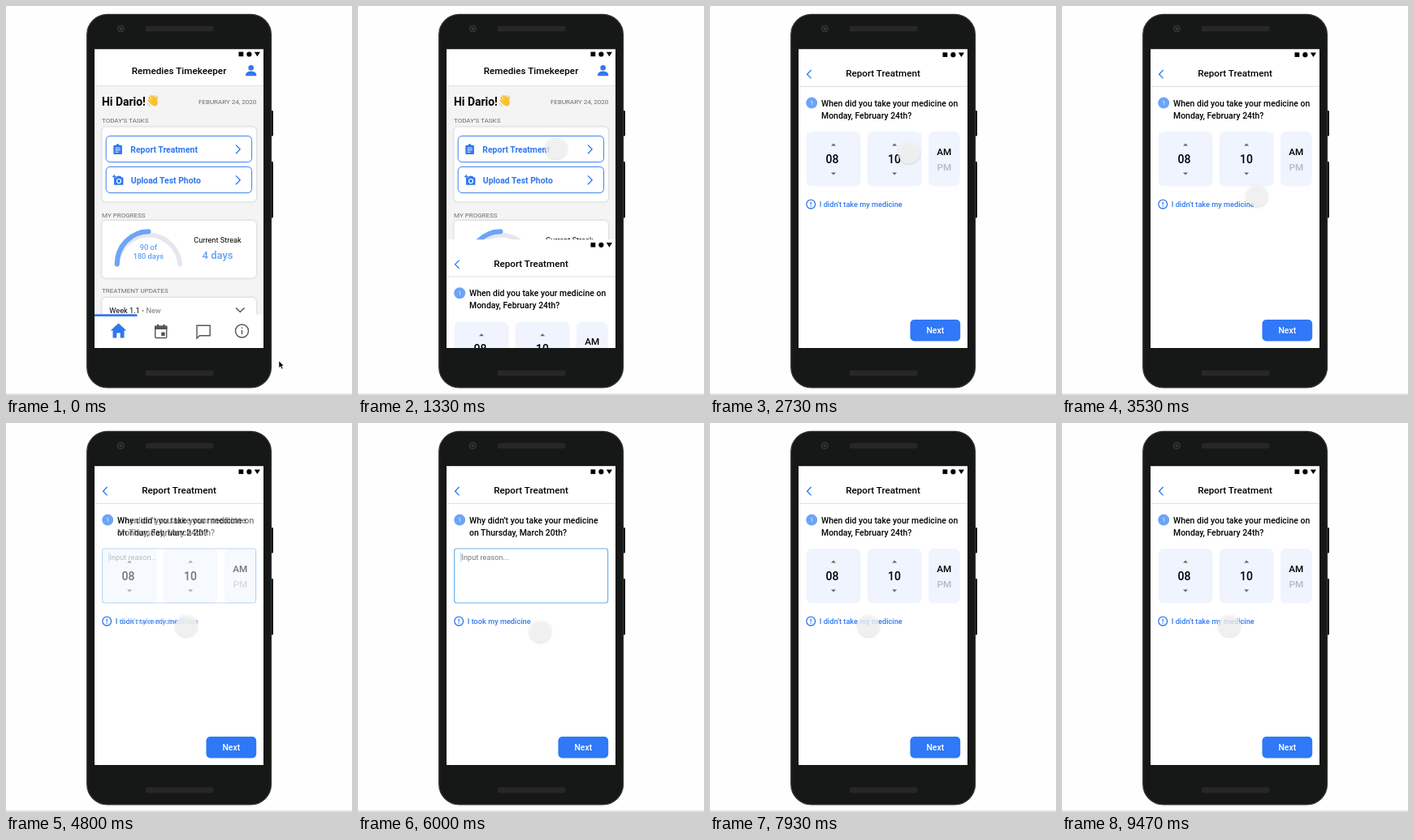
Write an HTML page that moves like this. It is 426 px wide and 480 px high and loops after 9790 ms.

```html
<!DOCTYPE html>
<html lang="en">
<head>
<meta charset="utf-8">
<title>Medicine app</title>
<style>
html, body { margin: 0; width: 100%; height: 100%; overflow: hidden; background: #fefefe; }
svg { display: block; width: 426px; height: 480px; }
text { font-family: Roboto, Arial, sans-serif; font-weight: 500; white-space: pre; }
.cap { font-size: 8px; font-weight: 400; fill: #6c6c6c; }
.small { font-size: 9.2px; }
.mid { font-size: 10.45px; }
.title { font-size: 11.7px; text-anchor: middle; }
.num { font-size: 14px; }
.c { text-anchor: middle; }
.blue { fill: #2f78ee; }
.soft { fill: #62a0f6; }
.line { fill: none; stroke: #2f78ee; stroke-width: 1.3; }
.gray { fill: none; stroke: #555; stroke-width: 1.4; }
.tile { fill: #eff4fe; }
.card { fill: #fff; filter: drop-shadow(0 0 1.5px #0003); }
</style>
</head>
<body>
<svg viewBox="0 0 426 480">
  <defs>
    <clipPath id="clip"><rect x="109" y="53.5" width="208" height="368.5"/></clipPath>
    <g id="status">
      <rect x="286.5" y="57.3" width="5.8" height="5.6"/>
      <circle cx="299.4" cy="60.2" r="3.1"/>
      <path d="M305.8 57.4h7.2l-3.6 5.6z"/>
    </g>
    <g id="frame">
      <rect x="109" y="53.5" width="208" height="369" fill="#fff"/>
      <use href="#status"/>
      <path d="M109 99.3h208" stroke="#dcdcdc"/>
      <path class="line" stroke-width="1.6" d="M124.6 79l-5 5.2 5 5.2"/>
      <text class="title" x="213" y="87.2">Report Treatment</text>
      <circle cx="125.2" cy="119.6" r="7" fill="#6ba5f7"/>
      <text class="c" x="125.2" y="122" font-size="7" fill="#d5e5fd">1</text>
      <circle class="line" cx="124.2" cy="244.6" r="5.4"/>
      <path class="line" d="M124.2 241.5v3.8m0 1.2v1.3"/>
      <rect x="246.5" y="387" width="61.7" height="26.5" rx="5" fill="#2f78f7"/>
      <text class="mid c" x="277.3" y="404" fill="#fff">Next</text>
    </g>
    <g id="stepper">
      <rect class="tile" x="-33.5" y="155" width="67" height="67.5" rx="7"/>
      <path d="M-3 172.6l3-3 3 3zM-3 205.6l3 3 3-3z" fill="#666"/>
    </g>
    <g id="task">
      <rect x="123.2" y="160.4" width="179.4" height="32.2" rx="5" fill="#fff" stroke="#3a7fee"/>
      <path class="line" stroke-width="1.6" d="M283 171.4l5.2 5.4-5.2 5.4"/>
    </g>
  </defs>

  <path d="M0 479h426" stroke="#c9c9c9"/>
  <rect x="324" y="129" width="5" height="31.5" rx="1.2" fill="#161616"/>
  <rect x="324" y="192" width="5" height="69.5" rx="1.2" fill="#161616"/>
  <rect x="99.8" y="10.4" width="226.6" height="460.4" rx="25" fill="#161717" stroke="#303030" stroke-width="1.4"/>
  <circle cx="141.3" cy="28" r="4" fill="#202020" stroke="#3c3c3c"/>
  <circle cx="141.3" cy="28" r="1.5" fill="#3a3a3a"/>
  <rect x="171.5" y="24.5" width="84" height="7" rx="3.5" fill="#272727"/>
  <rect x="171.5" y="449.5" width="84" height="7" rx="3.5" fill="#272727"/>

  <g clip-path="url(#clip)">
    <g id="home">
      <rect x="109" y="53" width="208" height="370" fill="#f4f4f4"/>
      <rect x="109" y="53" width="208" height="45" fill="#fff"/>
      <path d="M109 98.3h208" stroke="#e0e0e0"/>
      <use href="#status" y="-.7"/>
      <text class="title" x="213" y="84">Remedies Timekeeper</text>
      <circle class="blue" cx="301.7" cy="76.2" r="3.3"/>
      <path class="blue" d="M295.2 86.2v-1.6c0-2.6 4-4 6.5-4s6.5 1.4 6.5 4v1.6z"/>

      <text x="118" y="122.5" font-size="13.9" style="font-weight:700">Hi Dario!</text>
      <g fill="none" stroke="#f7c331" stroke-width="2.3" stroke-linecap="round">
        <path d="M176.2 113.2l5 6M178.4 111.2l5 6.500M181.4 111.2l4 6M184.800 118l.7-4.600M175.7 116.7l4 4"/>
        <ellipse cx="182.6" cy="119.4" rx="3.2" ry="2.5" transform="rotate(35 182.600 119.400)" fill="#f7c331"/>
        <path d="M184 110.500q2.200.8 2.800 2.800M174 119.800q.8 2.600 3.200 3.400" stroke="#d8b47a" stroke-width=".8"/>
      </g>
      <text class="cap" x="308.300" y="121" text-anchor="end">FEBURARY 24, 2020</text>

      <text class="cap" x="118" y="144.200">TODAY’S TASKS</text>
      <rect class="card" x="118.300" y="149.500" width="189.700" height="91.800" rx="5"/>
      <use href="#task"/>
      <use href="#task" y="38"/>
      <text class="mid blue" x="153.300" y="180.700" style="font-weight:700">Report Treatment</text>
      <text class="mid blue" x="153.800" y="218.700" style="font-weight:700">Upload Test Photo</text>
      <rect class="blue" x="132.300" y="171.800" width="10.600" height="11.200" rx="1.200"/>
      <circle class="blue" cx="137.600" cy="171.700" r="1.700"/>
      <path d="M134.500 175.200h6.200m-6.200 2.500h6.200m-6.200 2.500h4" stroke="#fff"/>
      <path class="blue" d="M133 211.500h2.500l1.500-1.700h4l1.400 1.700h2v9.200H133z"/>
      <circle cx="139" cy="216" r="2.500" fill="none" stroke="#fff" stroke-width="1.200"/>
      <path d="M131 210.300h4.600m-2.300-2.300v4.600" stroke="#2f78ee" stroke-width="1.200"/>

      <text class="cap" x="118" y="260.500">MY PROGRESS</text>
      <rect class="card" x="118.300" y="265" width="189.700" height="70.500" rx="5"/>
      <g fill="none" stroke-width="6" stroke-linecap="round">
        <path d="M136.700 318.500a39 40 0 0 1 77.600 0" stroke="#e6e6f1"/>
        <path d="M136.700 318.500a39 40 0 0 1 38.800-40.300" stroke="#6da5f4"/>
      </g>
      <text class="small soft c" x="175.300" y="301">90 of</text>
      <text class="small soft c" x="175.300" y="312">180 days</text>
      <text class="small c" x="260.500" y="292" style="font-weight:400">Current Streak</text>
      <text class="soft c" x="260.500" y="311.500" font-size="13">4 days</text>

      <text class="cap" x="118" y="354.300">TREATMENT UPDATES</text>
      <rect class="card" x="118.300" y="360" width="189.700" height="50" rx="5"/>
      <text class="small" x="127.300" y="379.300" style="font-weight:400">Week 1.1 <tspan fill="#777">• New</tspan></text>
      <path class="gray" d="M283 372.500l5.300 5 5.300-5"/>

      <rect x="109" y="380.500" width="208" height="43" fill="#fff"/>
      <rect class="blue" x="109" y="380.300" width="52.500" height="2.700"/>
      <path class="blue" d="M138.500 391.500l9.800 9h-2.800v9h-4.800v-6h-4.400v6h-4.800v-9h-2.800z"/>
      <rect class="gray" x="183.700" y="395.500" width="14" height="14" rx="1"/>
      <path d="M183 394.500h15.500v4.500H183zM186 392.800h2v2h-2zM193.500 392.800h2v2h-2zM191.200 402.500h4.500v4.500h-4.500z" fill="#555"/>
      <path class="gray" d="M235 394.300h16.200v12.400h-12.800L235 410z"/>
      <circle class="gray" cx="290.500" cy="401" r="8"/>
      <path class="gray" d="M290.500 400v5m0-8.600v1.600"/>
    </g>

    <g id="report">
      <use href="#frame"/>
      <text class="mid" x="137" y="123.500">When did you take your medicine on</text>
      <text class="mid" x="137" y="138.500">Monday, February 24th?</text>
      <use href="#stepper" x="152"/>
      <use href="#stepper" x="227.200"/>
      <rect class="tile" x="269" y="155" width="38.700" height="67.500" rx="7"/>
      <text class="num c" x="150.500" y="193.500">08</text>
      <text class="num c" x="227" y="193.500">10</text>
      <text class="title" x="288.300" y="183.800">AM</text>
      <text class="title" x="288.300" y="203" fill="#b6b9c2">PM</text>
      <text class="small blue" x="134.800" y="248">I didn’t take my medicine</text>
    </g>

    <g id="reason">
      <use href="#frame"/>
      <text class="mid" x="137" y="123.500">Why didn’t you take your medicine</text>
      <text class="mid" x="137" y="138.500">on Thursday, March 20th?</text>
      <rect x="118.600" y="155" width="189" height="67" rx="3" fill="#fff" stroke="#6fb1ec" stroke-width="1.200"/>
      <path d="M126.800 160v11.500" stroke="#8fc1f2"/>
      <text class="small" x="127.500" y="169" fill="#777" style="font-weight:400">Input reason...</text>
      <text class="small blue" x="134.800" y="248">I took my medicine</text>
    </g>
  </g>

  <g id="touch">
    <circle id="shade" r="13.300" fill="#f4f4f4" fill-opacity=".25" style="filter:drop-shadow(0 1.500px 1.500px #0009)"/>
    <circle r="13.300" fill="#f8f8f8" fill-opacity=".68"/>
  </g>
  <path id="arrow" d="M0 0v8.500l2-1.800 1.500 3.200 1.500-.7-1.500-3.100h2.600z" stroke="#fff" stroke-width=".5"/>
</svg>
<script>
const LOOP = 9790;
const $ = id => document.getElementById(id);
const span = (t, a, b) => Math.min(1, Math.max(0, (t - a) / (b - a)));
const smooth = p => p * p * (3 - 2 * p);
const fade = (t, a, b) => (1 - Math.cos(Math.PI * span(t, a, b))) / 2;

// Pointer stops: time, x, y
const stops = [
  [0, 336, 438], [1000, 244, 175],
  [2700, 244, 175], [3000, 270, 374], [3260, 143, 248], [3530, 240, 234], [3700, 229, 249], [3930, 222, 250],
  [5960, 222, 250], [6260, 270, 388], [6530, 161, 254], [6730, 195, 250],
  [8300, 195, 250], [8600, 232, 260], [8930, 206, 250], [LOOP, 206, 250]
];

function pointer(t) {
  const i = stops.findIndex(s => s[0] > t);
  const [a, x, y] = stops[i - 1], [b, u, v] = stops[i];
  const p = smooth(span(t, a, b));
  return [x + (u - x) * p, y + (v - y) * p];
}

// 1 while the finger is down, with soft edges
const press = (t, a, b) => span(t, a, a + 60) * (1 - span(t, b - 60, b));

function draw(now) {
  const t = now % LOOP;
  const [x, y] = pointer(t);
  const inside = x < 317 && y < 422;
  const rest = 1 - span(t, 1230, 1730);
  $("report").style.display = t < 1230 ? "none" : "";
  $("report").setAttribute("transform", `translate(0 ${368.5 * rest * rest})`);
  $("reason").style.opacity = fade(t, 4560, 5070) - fade(t, 6960, 7400);
  $("shade").style.opacity = 1 - press(t, 1070, 1270) - press(t, 4200, 4560) - press(t, 6810, 7070);
  $("touch").style.display = inside ? "" : "none";
  $("arrow").style.display = inside ? "none" : "";
  for (const id of ["touch", "arrow"]) $(id).setAttribute("transform", `translate(${x} ${y})`);
  requestAnimationFrame(() => draw(performance.now() - start));
}
const start = performance.now();
draw(0);
</script>
</body>
</html>
```
